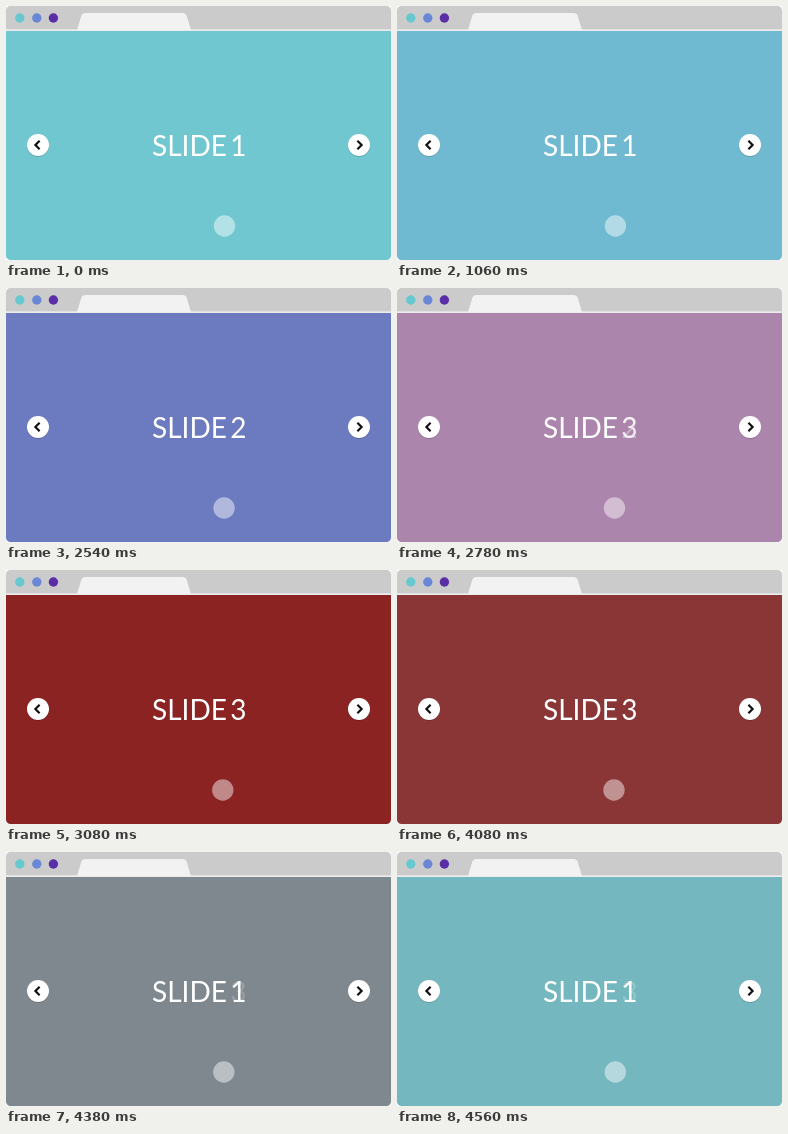
An HTML page that plays this animation: 385 px wide and 254 px high, repeating every 4.62 s.

```html
<!DOCTYPE html>
<html lang="en">
<head>
<meta charset="utf-8">
<title>Slider</title>
<style>
  html, body { margin: 0; width: 100%; height: 100%; overflow: hidden; background: #fff; }
  svg { display: block; width: 100%; height: 100%; }
  text { font: 400 28px Lato, sans-serif; fill: #fff; }
</style>
</head>
<body>
<svg viewBox="0 0 385 254">
  <defs>
    <clipPath id="window"><rect width="385" height="254" rx="4.5"/></clipPath>
  </defs>
  <g clip-path="url(#window)">
    <rect id="page" y="24" width="385" height="230"/>
    <rect width="385" height="24" fill="#cbcbcb"/>
    <rect y="23.3" width="385" height="1.7" fill="#ececec"/>
    <path d="M71 24 L75.4 9.6 Q76.2 7 79 7 H177 Q179.8 7 180.6 9.6 L185 24Z" fill="#f2f2f2"/>
    <circle cx="13.8" cy="12" r="4.7" fill="#68c8d0"/>
    <circle cx="30.8" cy="12" r="4.7" fill="#6a87d5"/>
    <circle cx="47.4" cy="12" r="4.7" fill="#5a2ea6"/>

    <text x="146" y="150">SLIDE</text>
    <text class="digit" x="224.2" y="150">1</text>
    <text class="digit" x="224.2" y="150">2</text>
    <text class="digit" x="224.2" y="150">3</text>

    <g fill="none" stroke="#111" stroke-width="2.2">
      <circle cx="32" cy="139.7" r="11" fill="#000" fill-opacity=".22" stroke="none"/>
      <circle cx="32" cy="139" r="11" fill="#fff" stroke="none"/>
      <path d="M33.6 134.8 L29.4 139 L33.6 143.2"/>
      <circle cx="353" cy="139.7" r="11" fill="#000" fill-opacity=".22" stroke="none"/>
      <circle cx="353" cy="139" r="11" fill="#fff" stroke="none"/>
      <path d="M351.4 134.8 L355.6 139 L351.4 143.2"/>
    </g>
    <circle id="spot" cy="220" r="10.7" fill="#fff" fill-opacity=".46"/>
  </g>
</svg>
<script>
  const HOLD = 1000, STEP = 60, SPAN = 1540;
  const teal = [112, 199, 208], blue = [106, 135, 213], red = [139, 35, 35];
  // Each fade lists its colour stops as [progress, rgb].
  const slides = [
    { spotX: 218.5, fade: [[0, teal], [1, blue]] },
    { spotX: 218.2, fade: [[0, blue], [0.1, [108, 123, 191]], [0.5, [172, 133, 173]], [1, red]] },
    { spotX: 216.8, fade: [[0, red], [0.3, [137, 88, 92]], [1, teal]] }
  ];
  const page = document.getElementById('page');
  const spot = document.getElementById('spot');
  const digits = document.querySelectorAll('.digit');

  const clamp = v => Math.max(0, Math.min(1, v));
  const mix = (a, b, p) => a + (b - a) * p;

  function colorAt(stops, p) {
    let i = 1;
    while (i < stops.length - 1 && p > stops[i][0]) i++;
    const [p0, from] = stops[i - 1], [p1, to] = stops[i];
    const rgb = from.map((v, k) => Math.round(mix(v, to[k], (p - p0) / (p1 - p0))));
    return `rgb(${rgb})`;
  }

  function draw(time) {
    const t = time % (SPAN * slides.length);
    const now = Math.floor(t / SPAN), next = (now + 1) % slides.length;
    const local = t - now * SPAN;
    const p = local < HOLD ? 0 : (Math.floor((local - HOLD) / STEP) + 1) / 10;
    const shown = clamp((p - 0.25) / 0.3);

    page.setAttribute('fill', colorAt(slides[now].fade, p));
    spot.setAttribute('cx', mix(slides[now].spotX, slides[next].spotX, p));
    digits.forEach((digit, i) => {
      const opacity = i === now ? 1 - 0.8 * shown : i === next ? shown : 0;
      digit.setAttribute('opacity', opacity);
    });
  }

  const start = performance.now();
  function tick() {
    draw(performance.now() - start);
    requestAnimationFrame(tick);
  }
  tick();
</script>
</body>
</html>
```
